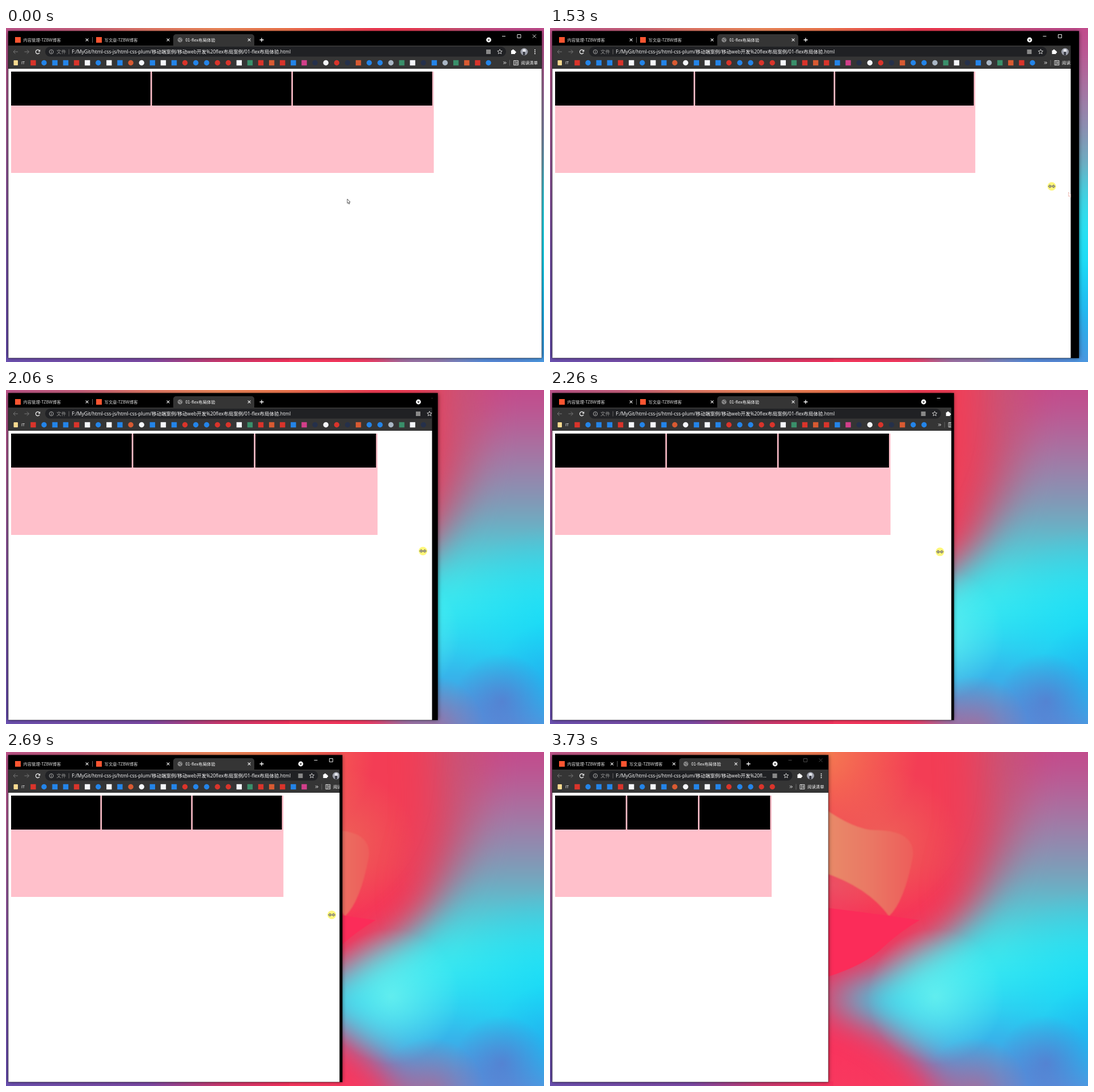
Recreate the animation shown at these times as an HTML page with a canvas. Size 949x590 px, loop 3790 ms.

```html
<!DOCTYPE html>
<html lang="zh-CN">
<head>
<meta charset="utf-8">
<title>Flex layout resize</title>
<style>
  html, body { margin: 0; width: 100%; height: 100%; overflow: hidden; background: #000; }
  canvas { display: block; }
</style>
</head>
<body>
<canvas id="stage" width="949" height="590"></canvas>
<script>
const LOOP = 3790, WIDTH = 949, HEIGHT = 590;
const LEFT = 4, TOP = 5.5, BOTTOM = 583, FULL = 945;
const BAR = '#353535';
const FONT = '"Open Sans", "Noto Sans CJK SC", "Noto Sans CJK", sans-serif';
const TAB_FONT = '"Noto Sans CJK SC", "Noto Sans CJK", "Noto Sans", sans-serif';
const TABS = ['内容管理-TZBW博客', '写文章-TZBW博客', '01-flex布局体验'];
const PATH = 'F:/MyGit/html-css-js/html-css-plum/移动端案例/移动web开发%20flex布局案例/01-flex布局体验.html';

// One letter per bookmark: its colour, capital for a square
const MARKS = 'RbBBRWbWBowBWBrbbrrWGRORBPkwrkObbsGWkBsGORb';
const COLORS = { r: '#d9342b', b: '#2484e8', w: '#f4f6fa', g: '#3a8f6a', o: '#d85a32', p: '#d23f8a', k: '#25304a', s: '#a9b6c4' };

// Drag: time, pointer x, painted edge, frame edge, layout edge
const DRAG = [
  [1010, 945, FULL, FULL, FULL],
  [1530, 885, 918.5, 933, 939.5],
  [2060, 735.5, 751.5, 761.5, 821],
  [2430, 647, 670.5, 670.5, 694],
  [2960, 492, 494.5, 505, 521.5],
  [3080, 380, 491, 491, 490.5],
  [3280, 100, 491, 491, 490.5]
];

// The screen refreshes about every 60 ms inside these spans and rests between them
const SPANS = [[50, 860], [1060, 1530], [1660, 2060], [2060, 2180], [2260, 2430],
  [2430, 2740], [2800, 2960], [2960, 3280], [3330, 3530], [3730, 3730]];
const TICKS = [0];
for (const [a, b] of SPANS) {
  const n = Math.round((b - a) / 60);
  for (let i = 0; i <= n; i++) TICKS.push(a + (b - a) * i / (n || 1));
}

const ctx = document.getElementById('stage').getContext('2d');
let g = ctx;

const ramp = (t, a, b) => Math.min(1, Math.max(0, (t - a) / (b - a)));
const smooth = k => k * k * (3 - 2 * k);
const mix = (a, b, k) => a + (b - a) * k;

function dragAt(t) {
  const i = Math.max(0, DRAG.findLastIndex(row => row[0] <= t));
  const a = DRAG[i], b = DRAG[i + 1] || a;
  return a.map((v, j) => mix(v, b[j], ramp(t, a[0], b[0] + 1)));
}

function stateAt(t) {
  let [, x, painted, frame, right] = dragAt(t);
  let y = 274 + 14 * Math.sin(ramp(t, 1010, 2960) * Math.PI / 2) + 32 * ramp(t, 2960, 3280);
  if (t < 1010) {
    const k = smooth(ramp(t, 0, 460));
    x = mix(602, 914, k) + 31 * ramp(t, 460, 560);
    y = mix(302, 290, k) - 9 * ramp(t, 460, 560) - 7 * ramp(t, 560, 860);
  }
  x -= 112 * ramp(t, 3280, 3530);
  return { x, y, painted, frame, right };
}

function rect(x, y, w, h, color) {
  g.fillStyle = color;
  g.fillRect(x, y, w, h);
}
function pill(x, y, w, h, r, color) {
  g.fillStyle = color;
  g.beginPath();
  g.roundRect(x, y, w, h, r);
  g.fill();
}
function disc(x, y, r, color) {
  g.fillStyle = color;
  g.beginPath();
  g.arc(x, y, r, 0, 7);
  g.fill();
}
function ring(x, y, r, color, from = 0, to = 7) {
  g.strokeStyle = color;
  g.beginPath();
  g.arc(x, y, r, from, to);
  g.stroke();
}
function shape(d, color) {
  g.fillStyle = color;
  g.fill(new Path2D(d));
}
// Strokes an SVG path drawn around a centre
function lines(x, y, d, color, width = 1) {
  g.save();
  g.translate(x, y);
  g.strokeStyle = color;
  g.lineWidth = width;
  g.stroke(new Path2D(d));
  g.restore();
}
function text(s, x, y, size, color, font = FONT) {
  g.font = size + 'px ' + font;
  g.fillStyle = color;
  g.fillText(s, x, y + size * .37);
}
// Evenly spaced colour stops
function fade(gradient, colors) {
  colors.forEach((c, i) => gradient.addColorStop(i / (colors.length - 1), c));
  return gradient;
}
const across = (w, ...colors) => fade(g.createLinearGradient(0, 0, w, 0), colors);
const down = (...colors) => fade(g.createLinearGradient(0, 0, 0, HEIGHT), colors);

function glow(x, y, r, color) {
  rect(x - r, y - r, 2 * r, 2 * r,
    fade(g.createRadialGradient(x, y, 0, x, y, r), [color, color.slice(0, 7) + '00']));
}
function blurred(radius, d, color) {
  g.filter = `blur(${radius}px)`;
  shape(d, color);
  g.filter = 'none';
}

function paintWallpaper() {
  const c = document.createElement('canvas');
  c.width = WIDTH;
  c.height = HEIGHT;
  g = c.getContext('2d');
  rect(0, 0, WIDTH, HEIGHT, down('#f33d55', '#f33d55', '#fb2c59', '#f8385f'));
  glow(480, 0, 170, '#f58a50d0');
  glow(590, 160, 130, '#ec7058b0');
  glow(500, 235, 80, '#e5607080');

  // peach petal
  blurred(1, 'M480 97 Q540 140 578 138 Q645 140 640 185 Q625 265 598 290 Q560 238 480 212',
    fade(g.createLinearGradient(490, 0, 645, 0), ['#e98a69', '#ea7764', '#ee5c5a']));

  // cool sweep over the warm side
  blurred(40, 'M765 -90 L770 130 L735 270 L860 270 L860 -90', '#c2587c');
  blurred(32, 'M835 -100 C840 200 790 270 640 368 C570 408 520 420 460 432 C580 470 680 520 760 700 L1080 700 L1080 -100',
    down('#c4488a', '#b3659a', '#9884ac', '#78a2ba', '#4cd0dc', '#38eef2', '#2cd8f2', '#36acea', '#5a8edb'));
  glow(680, 432, 120, '#70f4eec0');
  glow(960, 420, 180, '#10d8f8b0');
  glow(960, 510, 100, '#1caef0a0');
  glow(875, 550, 85, '#5a78ccc0');
  glow(750, 600, 95, '#b4688ec0');

  // crimson fold with a crisp lower edge
  shape('M470 273 Q570 285 652 297 Q615 318 580 352 Q545 382 470 403', '#fb2c59');

  // slivers left of, above and below the window
  rect(0, 0, 500, 7, across(500, '#c0568c', '#c9607f', '#e57a68', '#f28a5c', '#f2784f'));
  rect(0, 582, 500, 8, across(500, '#6c50b0', '#744da9', '#7c4aa6', '#c83a70', '#f5315c'));
  rect(0, 0, 7, HEIGHT, down('#c0568c', '#a45f9c', '#7d57ac', '#6a50b0'));
  g = ctx;
  return c;
}

const CROSS = 'M-2.4 -2.4 L2.4 2.4 M-2.4 2.4 L2.4 -2.4';

function drawTabs(right, dim) {
  const w = Math.min(143, (right - 162.5) / 3), on = 9 + 2 * w;
  pill(on, 11, w, 24, 5, BAR);
  rect(9 + w, 16, 1, 10, '#666');
  TABS.forEach((name, i) => {
    const x = 9 + i * w;
    if (i < 2) rect(x + 7, 16, 10, 10, '#fc5531');
    else {
      disc(x + 12, 21, 4.3, '#898989');
      lines(x + 12, 21, 'M-3 -1 L0 0 L1 3 M0 -3 L3 -1', '#4a4a4a');
    }
    text(name, x + 21.5, 21, 7.4, i < 2 ? '#ddd' : '#fff', TAB_FONT);
    lines(x + w - 9, 21, CROSS, '#f2f2f2', 1.1);
  });
  lines(on + w + 13, 21, 'M-3.5 0 H3.5 M0 -3.5 V3.5', '#fff', 1.3);
  disc(right - 93.5, 21, 4.4, '#fff');
  lines(right - 93.5, 21, 'M-1.4 -.6 L0 .8 L1.4 -.6', '#000', 1.3);

  const tone = dim ? '#484848' : '#e4e4e4';
  lines(right - 67, 14.5, 'M-3 0 H3', tone);
  lines(right - 40, 14.5, 'M-3 -3 H3 V3 H-3 Z', tone);
  lines(right - 13, 14.5, 'M-3 -3 L3 3 M-3 3 L3 -3', tone);
}

function fitPath(limit) {
  g.font = '8.5px ' + FONT;
  if (g.measureText(PATH).width <= limit) return PATH;
  let n = PATH.length;
  while (n > 1 && g.measureText(PATH.slice(0, n) + '...').width > limit) n--;
  return PATH.slice(0, n) + '...';
}

function drawStar(x, y) {
  g.strokeStyle = '#ddd';
  g.lineWidth = .9;
  g.beginPath();
  for (let i = 0; i < 10; i++) {
    const a = i * Math.PI / 5 - Math.PI / 2, r = i % 2 ? 2 : 4.4;
    g.lineTo(x + r * Math.cos(a), y + r * Math.sin(a));
  }
  g.closePath();
  g.stroke();
}

function drawToolbar(right) {
  const y = 42;
  pill(69, 33, right - 132, 17.5, 8.7, '#202124');
  lines(17, y, 'M4 0 H-4 M-.5 -3.5 L-4 0 L-.5 3.5', '#777');
  lines(36.5, y, 'M-4 0 H4 M.5 -3.5 L4 0 L.5 3.5', '#777');
  g.lineWidth = 1.3;
  ring(56, y, 3.5, '#f0f0f0', .5, 5.5);
  shape('M60.3 38 V41.7 H56.6', '#f0f0f0');
  g.lineWidth = 1;
  ring(80, y, 3.6, '#aaa');
  lines(80, y, 'M0 -2 V-1 M0 -.3 V2', '#bbb');
  text('文件', 89, y, 8.5, '#9a9a9a');
  rect(110.5, 37.5, 1, 9, '#666');
  text(fitPath(right - 223), 116, y, 8.5, '#fff');

  rect(right - 98, 38, 8, 8, '#888');
  drawStar(right - 74, y);
  rect(right - 54, 39.5, 7, 6.5, '#fff');
  disc(right - 50.5, 39.3, 1.6, '#fff');
  disc(right - 46.8, 42.7, 1.6, '#fff');
  disc(right - 31, y, 6.5, '#9a9da8');
  disc(right - 31, 40, 3, '#e2e4ea');
  rect(right - 33, 42, 3.5, 6, '#34363f');
  for (const d of [-3.2, 0, 3.2]) disc(right - 12, y + d, 1, '#fff');
}

function drawBookmarks(right) {
  const y = 61.5;
  pill(13.5, 57, 7.5, 9, 1, '#f6d98f');
  text('IT', 27, y, 7.4, '#fff');
  [...MARKS].forEach((mark, i) => {
    const x = 48 + i * 19.12, key = mark.toLowerCase();
    if (x > right - 83) return;
    if (mark === key) disc(x, y, 4.7, COLORS[key]);
    else rect(x - 4.7, y - 4.7, 9.4, 9.4, COLORS[key]);
  });
  lines(right - 65.5, y, 'M-2 -2 L0 0 L-2 2 M.5 -2 L2.5 0 L.5 2', '#fff');
  rect(right - 57, 56.5, 1, 10, '#666');
  lines(right - 45.5, y, 'M-4 -4 H4 V4 H-4 Z M-1.5 -4 V4 M0 -1.8 H3 M0 0 H3 M0 1.8 H3', '#e8e8e8', .9);
  text('阅读清单', right - 36.5, y, 7.4, '#fff', TAB_FONT);
}

function drawPage(right) {
  const w = (right - 13) * .8, cell = w / 3;
  rect(LEFT, 72, right + 30, BOTTOM - 72, '#fff');
  rect(9, 77, w, 179, '#ffc0cb');
  for (let i = 0; i < 3; i++) rect(9 + i * cell, 77, cell - 2.7, 60, '#000');
}

function drawArrow(x, y, edge) {
  const d = 'M0 0 V7.6 L1.7 6.2 L2.9 9 L4.1 8.4 L3 5.8 L5.2 5.6 Z';
  lines(x, y, d, '#fff', 2);
  lines(x, y, d, edge, .8);
}

function drawResize(x, y, pressed) {
  if (pressed) disc(x, y, 7.5, 'rgba(255,242,40,.62)');
  const d = 'M-4.5 0 H4.5 M-2.3 -2.3 L-4.7 0 L-2.3 2.3 M2.3 -2.3 L4.7 0 L2.3 2.3';
  lines(x, y, d, '#555', 2.3);
  lines(x, y, d, pressed ? '#f4eeb0' : '#eee', .8);
}

const wallpaper = paintWallpaper();

function draw(t) {
  const { x, y, painted, frame, right } = stateAt(t);
  const dim = t >= 300 && t < 1060 || t >= 3730;
  ctx.drawImage(wallpaper, 0, 0);

  ctx.save();
  ctx.shadowColor = 'rgba(0,0,0,.6)';
  ctx.shadowBlur = 7;
  rect(LEFT, TOP, frame - LEFT, BOTTOM - TOP, '#000');
  ctx.restore();

  ctx.save();
  ctx.beginPath();
  ctx.rect(LEFT, TOP, painted - LEFT, BOTTOM - TOP);
  ctx.clip();
  drawPage(right);
  drawTabs(right, dim);
  rect(LEFT, 31, right + 30, 41, BAR);
  drawToolbar(right);
  drawBookmarks(right);
  // faint trace the pointer leaves on the page
  if (t >= 460) drawArrow(914.5, 290, '#eeb5ae');
  ctx.restore();

  ctx.strokeStyle = 'rgba(0,0,0,.4)';
  ctx.lineWidth = 1;
  ctx.strokeRect(LEFT, TOP, frame - LEFT, BOTTOM - TOP);

  if (t < 460) drawArrow(x, y, '#333');
  else if (t < 3730) drawResize(x, y, t >= 1060);
}

const start = performance.now();
function tick() {
  const now = (performance.now() - start) % LOOP;
  draw(TICKS.findLast(t => t <= now));
  requestAnimationFrame(tick);
}
tick();
</script>
</body>
</html>
```
